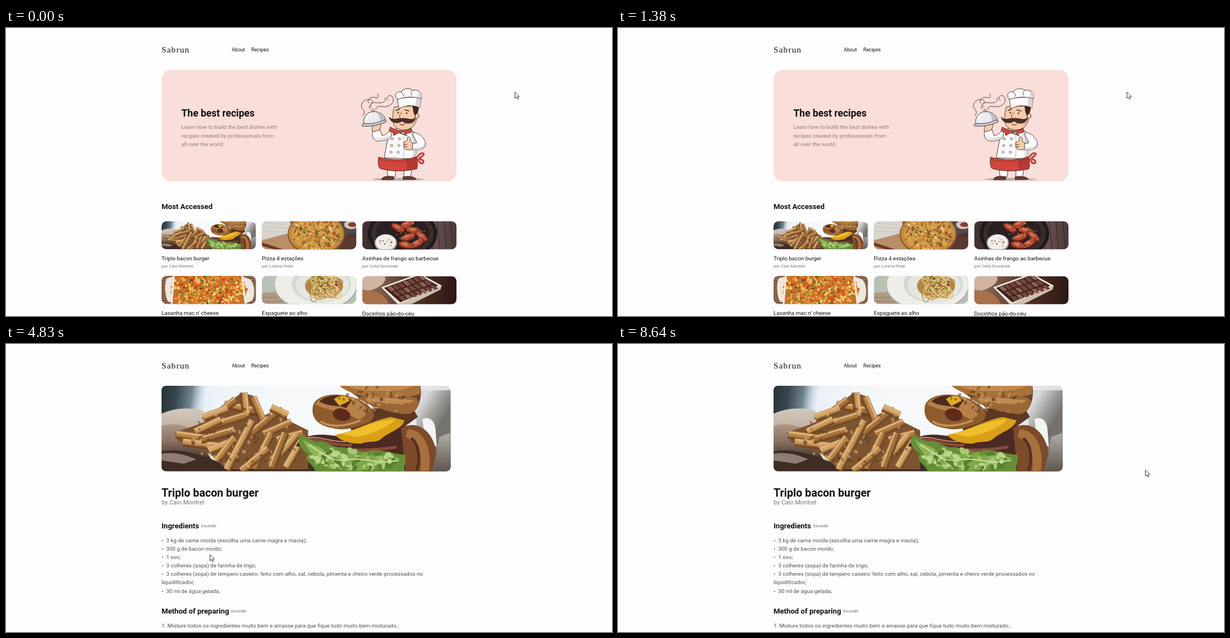
These frames come from a looping animation (1083x517 px, 8970 ms). An HTML page with a canvas:

```html
<!DOCTYPE html>
<html lang="pt">
<head>
<meta charset="utf-8">
<title>Recipes</title>
<style>
html,body{margin:0;width:100%;height:100%;overflow:hidden;background:#fdfdfd}
#stage{position:relative;width:1083px;height:517px;overflow:hidden;background:#fdfdfd;font-family:Roboto,sans-serif}
.page,.group{position:absolute;left:0;top:0;width:1083px}
canvas{position:absolute;left:0;top:0}
.t{position:absolute;white-space:pre;line-height:15.1px;font-size:9.88px;color:#111}
.logo{font:15px/15.1px "Liberation Serif",serif;letter-spacing:1.3px}
.nav{font-size:8.8px}
.hero,.h1,.h2,.h3{font-weight:700;margin-top:.6px}
.hero{font-size:17.5px}
.soft{color:#8b7f7c}
.h1{font-size:19.7px}
.h2{font-size:13.15px}
.h3{font-size:10.94px}
.by{font-size:7.7px;color:#777}
.author{font-size:10.94px;color:#777}
.body{color:#505050}
.btn{font-size:6.56px;font-weight:500;color:#888}
#foot{position:absolute;left:0;top:568px;width:1083px;height:33px;background:#f9f9f9}
.foot{width:1083px;text-align:center;font-size:7.66px;color:#888}
#status{position:absolute;left:0;bottom:0;height:14px;padding:0 2px;background:#2b2a33;color:#f5f5f7;font:7.6px/14px "Open Sans",sans-serif;white-space:pre}
</style>
</head>
<body>
<div id="stage">
  <div class="page" id="home"><div id="foot"></div></div>
  <div class="page" id="about"></div>
  <div class="page" id="recipe">
    <div class="group" id="ingr"></div>
    <div class="group" id="method"></div>
  </div>
  <div id="status"></div>
  <canvas id="pointer" width="1083" height="517"></canvas>
</div>
<script>
const $ = id => document.getElementById(id);
const BRAND = 'Sabrun', HOST = 'kitchenpc:7300', COOK = 'Caio Montrel';

// ---------- text ----------
function text(parent, x, cy, cls, str) {
  const el = document.createElement('div');
  el.className = 't ' + cls;
  el.style.left = x + 'px';
  el.style.top = cy - 7.55 + 'px';
  el.textContent = str;
  parent.appendChild(el);
  return el;
}

// ---------- drawing helpers ----------
function layer(parent, h) {
  const cv = document.createElement('canvas');
  cv.width = 1083; cv.height = h;
  parent.prepend(cv);
  return cv.getContext('2d');
}
function random(seed) {
  return () => (seed = seed * 16807 % 2147483647) / 2147483647;
}
function path(c, d, fill, line, width = 0.9) {
  const p = new Path2D(d);
  if (fill) { c.fillStyle = fill; c.fill(p); }
  if (line) { c.strokeStyle = line; c.lineWidth = width; c.stroke(p); }
}
function oval(c, x, y, rx, ry, fill, rot = 0, line, width = 0.9) {
  c.beginPath();
  c.ellipse(x, y, rx, ry, rot, 0, 7);
  if (fill) { c.fillStyle = fill; c.fill(); }
  if (line) { c.strokeStyle = line; c.lineWidth = width; c.stroke(); }
}
function grad(c, x0, y0, x1, y1, colors) {
  const g = c.createLinearGradient(x0, y0, x1, y1);
  colors.forEach((col, i) => g.addColorStop(i / (colors.length - 1), col));
  return g;
}
function bg(c, fill, w = 169, h = 51) {
  c.fillStyle = fill;
  c.fillRect(0, 0, w, h);
}
// scattered toppings inside an ellipse
function dots(c, seed, n, x, y, rx, ry, size, cols) {
  const r = random(seed);
  for (let i = 0; i < n; i++) {
    const a = r() * 6.283, d = Math.sqrt(r());
    oval(c, x + Math.cos(a) * d * rx, y + Math.sin(a) * d * ry,
      size * (0.5 + r()), size * (0.4 + r() * 0.6), cols[i % cols.length], r() * 3);
  }
}
function photo(c, x, y, w, h, r, draw, k = 1) {
  c.save();
  c.beginPath();
  c.roundRect(x, y, w, h, r);
  c.clip();
  c.translate(x, y);
  c.scale(k, k);
  draw(c);
  c.restore();
}

// ---------- pictures ----------
function fry(c, x0, y0, x1, y1, tone) {
  const len = Math.hypot(x1 - x0, y1 - y0), nx = (y0 - y1) / len, ny = (x1 - x0) / len;
  const side = ny > 0 ? 1 : -1;
  for (const [col, w, off] of [['#6b4526', 14, 1.5], [tone, 11.5, 0], ['#dcb580', 3, -3], ['#8f5f30', 2, 4.5]]) {
    c.strokeStyle = col; c.lineWidth = w;
    const ox = nx * off * side, oy = ny * off * side;
    c.beginPath(); c.moveTo(x0 + ox, y0 + oy); c.lineTo(x1 + ox, y1 + oy); c.stroke();
  }
}

function burger(c) {
  // blurred room
  bg(c, grad(c, 0, 0, 517, 0, ['#dbe7f0', '#eef4f8', '#f6f8f9', '#f6f8f9', '#eff1f2', '#dcdfe0']), 517, 154);
  bg(c, grad(c, 0, 0, 82, 12, ['#263236', '#39474c', '#71848f', 'rgba(200,217,229,0)']), 84, 60);
  path(c, 'M0 50C22 40 48 38 74 44L84 72L60 92L0 84Z', grad(c, 0, 44, 0, 92, ['#d2c6bb', '#b9a595']));
  path(c, 'M0 72C24 66 44 70 60 84L100 150H0Z', grad(c, 0, 70, 0, 128, ['#ad9686', '#8a7363', '#493a31']));
  path(c, 'M0 118C30 112 62 120 110 140L280 118L430 140L517 134V154H0Z', '#3f2d25');
  path(c, 'M0 122C24 118 44 124 62 132L40 140L0 134Z', '#8d7d72');
  path(c, 'M452 8H517V152H460Z', grad(c, 452, 0, 517, 40, ['#c6c8cc', '#d9dbdc', '#a3a29f', '#75716d']));
  path(c, 'M466 60C478 54 490 62 490 84L492 110L470 92Z', '#f2f4f3');
  path(c, 'M496 92L517 84V154H486Z', grad(c, 0, 90, 0, 154, ['#aaa6a2', '#5d5550']));

  // fries
  path(c, 'M24 84C48 74 92 66 106 40L144 12L164 18L178 56L214 38L226 62L262 80L262 150H116L88 124L30 100Z', '#7d5330');
  const tones = ['#bd8647', '#cb9859', '#a97139', '#d3a264', '#b47c40'];
  [[112, 32, 176, 46], [148, 12, 152, 54], [104, 46, 132, 24], [74, 56, 118, 40], [92, 70, 150, 52],
    [164, 20, 182, 62], [60, 82, 106, 60], [160, 84, 208, 44], [196, 38, 226, 52], [182, 86, 232, 64],
    [26, 86, 84, 94], [38, 100, 104, 108], [70, 96, 130, 78], [84, 116, 128, 98], [206, 96, 252, 84],
    [98, 134, 130, 92], [212, 122, 242, 86], [196, 146, 220, 84], [222, 146, 250, 98], [164, 148, 196, 84],
    [142, 152, 190, 112], [116, 150, 162, 62]
  ].forEach((f, i) => fry(c, ...f, tones[i % 5]));
  dots(c, 61, 80, 150, 92, 100, 54, 3, ['rgba(92,56,26,.55)', 'rgba(228,190,138,.5)']);

  // bacon and patties
  path(c, 'M240 108C254 84 290 84 330 94L432 66L452 92L440 132L300 126Z', '#4a2a22');
  path(c, 'M246 100C272 88 306 110 340 106M262 114C292 104 330 124 420 110', null, '#8a4c39', 5);
  path(c, 'M252 96C276 86 300 102 330 100', null, '#c08a72', 2);
  path(c, 'M428 76C462 58 488 88 491 122L484 154H436Z', '#7d4a2a');
  path(c, 'M440 78C468 78 484 112 478 152L462 154C468 122 454 98 436 92Z', '#a9703f');
  path(c, 'M446 94C462 106 462 134 456 152', null, '#54301f', 5);

  // stacked rings, cheese and bun
  path(c, 'M330 46L446 34L458 56L436 72L340 84Z', '#5e3822');
  path(c, 'M316 -4H462C466 18 462 44 442 52C420 46 396 36 362 28Z', '#6f4424');
  path(c, 'M350 22C380 12 440 14 460 24C462 40 448 54 430 50C404 48 372 36 350 22Z', '#9b6636');
  path(c, 'M364 24C396 18 430 24 452 26C446 36 400 34 364 24Z', '#bf8a50');
  path(c, 'M314 -4H462V14C444 24 420 14 396 22C366 22 330 14 314 -4Z', '#a8713c');
  path(c, 'M326 -4H456C448 6 420 10 390 9C360 10 338 6 326 -4Z', '#c08a50');
  path(c, 'M310 88C340 84 376 62 410 56L434 62C430 78 408 82 394 94C384 104 370 98 356 104C338 104 320 100 310 88Z', '#d99f16');
  path(c, 'M320 86C350 80 380 62 418 60C404 76 372 88 348 92Z', '#f0bf2c');
  path(c, 'M270 40C272 10 330 10 358 28C384 42 386 60 366 68C346 74 330 82 306 76C282 72 268 60 270 40Z', '#8f5a2c');
  path(c, 'M274 34C286 12 330 12 352 28C372 40 372 54 352 60C330 48 304 46 274 34Z', '#b8814a');
  path(c, 'M282 28C296 14 326 14 340 26L330 40C312 34 298 38 282 28Z', '#4b2b1a');
  path(c, 'M308 24C318 15 334 17 336 27L318 36Z', '#e3ab1f');
  oval(c, 322, 52, 16, 11, '#5e2a1c', 0.25);
  path(c, 'M284 64C306 78 336 70 356 62', null, '#c39058', 4);
  dots(c, 15, 60, 384, 24, 76, 24, 3, ['rgba(80,46,22,.5)', 'rgba(214,164,106,.45)']);

  // lettuce
  path(c, 'M246 90C256 84 262 100 280 100C296 98 304 112 322 110C344 112 354 122 376 116C396 114 412 122 436 124C438 138 430 146 436 154H276C270 140 252 134 262 122C250 116 242 104 246 90Z', '#668f38');
  path(c, 'M252 96C268 108 282 106 292 118C312 114 326 128 346 122C366 130 390 120 426 130C408 142 388 132 372 150C340 138 312 150 292 138C278 134 262 118 252 96Z', '#8db556');
  dots(c, 9, 95, 342, 134, 78, 18, 6, ['#7fa84a', '#a9c974', '#56802f', '#bcd68b']);
  path(c, 'M262 106C290 120 300 140 336 132C362 128 380 142 424 134', null, '#cfe0a4', 2);
}

function pizza(c) {
  bg(c, grad(c, 0, 0, 169, 0, ['#a98a76', '#8d6750', '#6d4535', '#4b312b']));
  path(c, 'M0 0H50L56 22L4 34L0 32Z', '#d9d5cf');
  path(c, 'M8 3L42 6M6 10L46 13M4 18L50 19', null, '#c4beb7', 1);
  path(c, 'M0 34L60 18L70 51H0Z', '#b78e67');
  path(c, 'M0 38L40 51H24L0 44Z', '#70352c');
  path(c, 'M130 0H169V20L140 26Z', '#51494a');
  oval(c, 160, 6, 13, 8, '#cfc5bd');
  oval(c, 162, 6, 8, 4, '#8c3a2e');
  path(c, 'M142 34L169 26V51H138Z', '#5a3a31');
  oval(c, 97, 23, 51, 38, '#8f5726');
  oval(c, 97, 22, 49, 36, '#c48a42');
  oval(c, 97, 22, 43, 31, '#d39b45');
  dots(c, 21, 190, 97, 22, 42, 30, 2.3, ['#dcb560', '#ad4f2a', '#e6cf95', '#8a5a2a', '#b9742f', '#77702f']);
  path(c, 'M97 22L52 8M97 22L62 51M97 22L108 56M97 22L144 36M97 22L134 -4M97 22L88 -8', null, '#7d4a21', 0.9);
}

function wings(c) {
  bg(c, grad(c, 0, 0, 169, 0, ['#453433', '#2c2223', '#3a2a2a', '#6a5250', '#4c3a39']));
  for (let x = 122; x < 169; x += 12) path(c, `M${x} 0L${x + 5} 51`, null, '#32272a', 1.2);
  oval(c, 72, 22, 62, 46, '#1f191b');
  oval(c, 72, 22, 56, 40, '#392c2b');
  oval(c, 72, 22, 48, 33, '#2a2021');
  const spots = [[80, 6, -0.3], [64, 12, 0.5], [92, 17, 0.2], [106, 27, 0.7], [82, 29, -0.3], [98, 40, -0.5], [78, 43, 0.2]];
  for (const [x, y, a] of spots) {
    oval(c, x, y, 14, 6.5, '#6d2519', a);
    oval(c, x, y - 1, 12, 5, '#b04a30', a);
    oval(c, x - 2, y - 2.3, 6, 1.8, '#d37c57', a);
  }
  dots(c, 5, 55, 88, 24, 27, 24, 0.8, ['#f0d9b9', '#e3a36c']);
  oval(c, 42, 39, 20, 16, '#aaa6a2');
  oval(c, 42, 38, 18, 14, '#f0efea');
  dots(c, 12, 24, 42, 38, 12, 9, 1.2, ['#7f9a56', '#d3d8c3', '#b6524a']);
}

function lasagna(c) {
  bg(c, '#74503a');
  for (let y = 2; y < 51; y += 4) path(c, `M0 ${y}H169`, null, '#a98260', 1.3);
  path(c, 'M10 4C4 10 6 40 12 46L28 51H148L162 44C168 34 166 12 158 6L140 0H28Z', '#ece7de');
  path(c, 'M22 0H144L150 51H18Z', '#c8722a');
  dots(c, 31, 430, 84, 25, 68, 34, 2.7, ['#e18a2e', '#f1bd52', '#c4491f', '#efa23e', '#d9652a', '#f4d37d']);
  dots(c, 44, 80, 84, 25, 64, 29, 1.7, ['#4f7c2b', '#78963b', '#365c22']);
  path(c, 'M22 0L18 51M144 0L150 51', null, '#f1ece4', 3);
}

function pasta(c) {
  bg(c, grad(c, 0, 0, 169, 20, ['#b6bfb0', '#c9d2c8', '#b9c2b8']));
  path(c, 'M0 31L50 26L66 51H0Z', '#b19a85');
  path(c, 'M0 39L58 38M0 46L62 46', null, '#91735c', 1.2);
  oval(c, 96, 18, 74, 46, '#a5aaa0');
  oval(c, 96, 16, 73, 45, '#eceee8');
  oval(c, 106, 15, 53, 33, '#d4dad1');
  oval(c, 108, 17, 47, 30, '#e4e7e0');
  const r = random(18);
  oval(c, 111, 18, 34, 22, '#b68c48');
  for (let i = 0; i < 60; i++) {
    oval(c, 111 + (r() - 0.5) * 36, 18 + (r() - 0.5) * 22, 7 + r() * 13, 4 + r() * 8,
      null, r() * 3, ['#d7b46b', '#ead092', '#a97938'][i % 3], 1.2);
  }
  dots(c, 8, 34, 108, 13, 27, 15, 2, ['#4f6c2c', '#78893a', '#733c26']);
}

function sweets(c) {
  bg(c, grad(c, 0, 0, 169, 20, ['#9a7a68', '#6d4a3b', '#4a2a21', '#2d1813']));
  path(c, 'M0 0H40C46 10 30 22 12 26L0 24Z', '#d0b3a0');
  path(c, 'M0 28C18 22 40 30 48 51H0Z', '#a9714b');
  path(c, 'M34 20L102 -5L142 17L140 24L72 58L64 51Z', '#cfc0b2');
  path(c, 'M34 20L102 -5L142 17L66 50Z', '#f0e8df');
  path(c, 'M39 21L102 -2L136 17L68 47Z', '#3c211b');
  for (let i = 0; i < 7; i++) {
    for (let j = 0; j < 3; j++) {
      const x = 44 + i * 9.3 + j * 10.5, y = 20 - i * 3.3 + j * 8.7;
      path(c, `M${x} ${y}l6.8 -2.5l8.4 7l-6.8 2.8z`, (i + j) % 3 ? '#714237' : '#8c6053');
      path(c, `M${x + 2} ${y}l8 7`, null, '#a7786a', 0.7);
    }
  }
}

function chef(c) {
  const ink = '#3d2a26', skin = '#f6cba9', coat = '#fbfafa', shade = '#d8d5d8', red = '#d2473d';
  const draw = (d, fill, line = ink) => path(c, d, fill, line);
  c.lineJoin = c.lineCap = 'round';
  oval(c, 701, 271.5, 47, 2.2, '#b9aaa6');
  draw('M681 254L683 268H695L697 255ZM711 255V268H723L725 254Z', coat);
  draw('M671 272C672 266 684 265 693 267V272ZM710 267C720 265 732 267 733 272H710Z', '#6b3a2c');
  path(c, 'M734 233C742 220 751 225 744 230C738 234 736 234 744 237C750 242 742 248 736 236', null, '#8d2a27', 3);
  path(c, 'M734 233C742 220 751 225 744 230C738 234 736 234 744 237C750 242 742 248 736 236', null, red, 1.8);
  draw('M688 184C682 194 680 212 676 233L731 235C735 220 735 200 728 186C716 178 700 178 688 184Z', coat);
  draw('M719 184C729 198 730 216 726 234L731 235C736 218 736 198 728 186Z', shade, null);
  draw('M709 190C713 204 712 220 710 234', null, '#b5aeb0');
  for (let i = 0; i < 3; i++) for (const x of [690, 703]) oval(c, x - i, 199 + i * 12, 2, 2, '#fff', 0, ink, 0.7);
  draw('M666 232C690 238 715 238 733 231C736 240 736 250 734 253C712 258 686 258 668 252C664 246 665 238 666 232Z', red);
  draw('M714 237L733 232C736 240 736 250 734 253L717 255Z', '#b53a33', null);
  draw('M666 236C690 241 715 241 734 235', null, '#8d2a27');
  // raised arm with the dish
  draw('M689 183C682 188 676 194 672 193L668 181L655 185C654 194 656 202 664 203C676 203 686 200 688 196Z', coat);
  draw('M658 197C664 202 678 201 686 196L688 192C680 198 668 199 658 197Z', shade, null);
  draw('M656 186C652 180 655 174 661 173L669 172C672 175 668 180 667 183Z', skin);
  oval(c, 658, 171, 22.5, 4, '#c9c9cd', -0.17, ink);
  draw('M639 171C638 157 648 150 657 150C669 150 677 157 678 164C666 170 650 173 639 171Z', '#ececef');
  draw('M661 151C671 152 677 158 677 164L667 168C670 162 667 155 661 151Z', '#bfbfc5', null);
  path(c, 'M645 165C645 159 648 156 652 154', null, '#fff', 1.8);
  oval(c, 656, 148.5, 2.2, 2, '#e6e6ea', 0, ink);
  draw('M651 145C643 139 662 134 652 129C643 126 632 134 636 143C639 148 644 152 637 157', null);
  draw('M661 146C662 136 672 143 680 141C691 139 695 129 690 123C684 118 677 125 683 129', null);
  draw('M654 143C648 138 652 133 662 134C676 136 681 130 677 125M648 135C644 129 652 122 660 125C666 128 666 121 664 118', null);
  // head
  draw('M694 142C690 152 691 166 693 174C698 184 716 186 726 178C735 170 737 152 734 140Z', skin);
  draw('M727 173C733 166 735 154 733 144L729 145C730 156 729 166 723 177Z', '#e3aa86', null);
  draw('M726 139L738 138C738 148 736 154 731 157C727 152 728 146 726 139Z', '#3b2621', null);
  oval(c, 735, 158, 3.2, 4.5, skin, 0.1, ink);
  oval(c, 701, 152, 1.2, 1.7, ink);
  oval(c, 716, 153, 1.2, 1.7, ink);
  path(c, 'M697 148L703 146M713 147L720 149', null, ink, 1.6);
  draw('M707 152C700 159 703 164 711 162', skin);
  draw('M708 163C700 160 692 168 685 160C687 172 702 172 708 167C716 174 730 172 732 161C724 168 717 160 708 163Z', '#4a2f28');
  path(c, 'M704 173C708 175 711 174 713 172', null, '#a54f41', 1.5);
  draw('M699 126L702 145C714 138 728 138 740 143L742 124Z', coat);
  draw('M733 124L732 140L740 143L742 124Z', shade, null);
  draw('M700 128C692 122 698 112 706 115C710 107 724 108 727 112C736 109 746 116 742 127C728 122 712 124 700 128Z', coat);
  draw('M733 113C738 116 738 121 735 124L742 126C745 118 740 112 733 113Z', shade, null);
  draw('M706 115C710 117 711 120 710 123M727 112C723 115 723 118 725 121', null);
  draw('M687 178C700 186 716 186 724 180L726 186C716 191 706 191 702 188L693 193L691 187L685 185ZM704 188L717 194L711 187Z', red);
  // thumbs-up arm
  draw('M729 187C742 190 752 202 749 212C746 218 736 220 726 219L724 208L734 206C732 200 728 196 727 190Z', coat);
  draw('M749 208C746 214 736 216 726 215V219C738 220 748 218 749 208Z', shade, null);
  draw('M711 205C716 204 718 201 717 197C720 193 724 196 722 203L727 206L726 218C720 220 711 218 711 214Z', skin);
  draw('M711 209H717M711 213H717', null);
}

// ---------- pages ----------
const home = $('home'), about = $('about'), recipe = $('recipe'), ingr = $('ingr'), method = $('method');

for (const p of [home, about, recipe]) {
  text(p, 278, 39.5, 'logo', BRAND);
  text(p, 403.5, 40, 'nav', 'About');
  text(p, 438.5, 40, 'nav', 'Recipes');
}

const hc = layer(home, 602);
hc.fillStyle = '#f9deda';
hc.beginPath(); hc.roundRect(278, 75, 527, 200.5, 17); hc.fill();
chef(hc);
text(home, 313.5, 152.5, 'hero', 'The best recipes');
text(home, 313.5, 178, 'soft', 'Learn how to build the best dishes with\nrecipes created by professionals from\nall over the world.');
text(home, 278, 320, 'h2', 'Most Accessed');
[
  ['Triplo bacon burger', COOK, burger, 0.3264],
  ['Pizza 4 estações', 'Lorena Pidal', pizza],
  ['Asinhas de frango ao barbecue', 'Celia Drovanek', wings],
  ["Lasanha mac n' cheese", 'Renato Queiral', lasagna],
  ['Espaguete ao alho', 'Alícia Temura', pasta],
  ['Docinhos pão-do-céu', 'Marcelo Bastim', sweets]
].forEach(([name, who, draw, k], i) => {
  const x = 278 + i % 3 * 179.3, y = 347 + (i > 2 ? 98 : 0) + (i === 5 ? 0.6 : 0);
  photo(hc, x, y, 168.5, 50.2, 8.8, draw, k);
  text(home, x, y + 66.4 + (i === 5 ? 0.6 : 0), '', name);
  text(home, x, y + 80.4 + (i === 5 ? 0.6 : 0), 'by', 'por ' + who);
});
text(home, 0, 585, 'foot', `Todos direitos reservados, receitas ${BRAND}.`);

const second = `Fusce nec pulvinar nunc. Duis porttitor tincidunt accumsan. Quisque pulvinar mollis ipsum ut accumsan. Proin ligula
lectus, rutrum vel nisl quis, efficitur porttitor nisl. Morbi ut accumsan felis, eu ultrices lacus. Integer in tincidunt arcu, et
posuere ligula. Morbi cursus facilisis feugiat. Praesent euismod nec nisl at accumsan. Donec libero neque, vulputate
semper orci et, malesuada sodales eros. Nunc ut nulla faucibus enim ultricies euismod.`;
const both = `Suspendisse placerat neque neque. Morbi dictum nulla non sapien rhoncus, et mattis erat commodo. Aliquam vel lacus
a justo mollis luctus. Proin vel auctor eros, sed eleifend nunc. Curabitur eget tincidunt risus. Mauris malesuada facilisis
magna, vitae volutpat sapien tristique eu. Morbi metus nunc, interdum in erat placerat, aliquam iaculis massa. Duis
vulputate varius justo pharetra maximus. In vehicula enim nec nibh porta tincidunt. Vestibulum at ultrices turpis, non
dictum metus. Vivamus ligula ex, semper vitae eros ut, euismod convallis augue.

` + second;
text(about, 278, 84, 'h2', 'Sobre o ' + BRAND);
text(about, 278, 106, 'body', both);
text(about, 278, 275, 'h3', 'Como tudo começou...');
text(about, 278, 297, 'body', both);
text(about, 278, 465, 'h3', 'Nossas receitas');
text(about, 278, 487, 'body', second);

photo(layer(recipe, 517), 278, 75, 516.5, 153.5, 8, burger);
text(recipe, 278, 266.5, 'h1', 'Triplo bacon burger');
text(recipe, 278, 285, 'author', 'by ' + COOK);
text(recipe, 278, 326, 'h2', 'Ingredients');
const ingrBtn = text(recipe, 349, 328, 'btn', '');
text(ingr, 278, 352.5, 'body', `•  3 kg de carne moída (escolha uma carne magra e macia);
•  300 g de bacon moído;
•  1 ovo;
•  3 colheres (sopa) de farinha de trigo;
•  3 colheres (sopa) de tempero caseiro: feito com alho, sal, cebola, pimenta e cheiro verde processados no
liquidificador;
•  30 ml de água gelada;`);
text(method, 278, 479, 'h2', 'Method of preparing');
const methodBtn = text(method, 402.5, 481, 'btn', '');
const steps = text(method, 278, 505.5, 'body', `1. Misture todos os ingredientes muito bem e amasse para que fique tudo muito bem misturado.;
2. Faça porções de 90 g a 100 g.;
3. Forre um plástico molhado em uma bancada e modele os hambúrgueres utilizando um aro como base.;
4. Faça um de cada vez e retire o aro logo em seguida.;
5. Forre uma assadeira de metal com plástico, coloque os hambúrgueres e intercale camadas de carne e plásticos (sem
apertar).;
6. Faça no máximo 4 camadas por forma e leve para congelar.;
7. Retire do congelador, frite ou asse e está pronto.;`);

// ---------- timeline ----------
const LOOP = 8970;
const scrollKeys = [[0, 0], [460, 1], [490, 4], [520, 12], [550, 26], [580, 44], [610, 73], [640, 81], [670, 84],
  [1230, 81], [1260, 68], [1290, 40], [1320, 14], [1350, 3], [1380, 0]];
// start, end, x, y of each pointer move
const moves = [[0, 0, 909.5, 115], [1710, 2500, 406, 41], [2930, 3650, 316, 38], [3880, 4480, 364.5, 378],
  [4830, 5600, 362, 332], [5790, 6130, 417, 365.5], [6820, 7620, 362, 343], [7640, 7740, 362, 332], [7990, 8640, 942.5, 226]];
const shapes = [[0, 'arrow'], [2400, 'hand'], [2990, 'arrow'], [3500, 'hand'], [4030, 'arrow'], [4280, 'hand'],
  [4700, 'arrow'], [5480, 'beam'], [5850, 'arrow'], [6070, 'beam'], [6900, 'arrow'], [7560, 'beam'], [8060, 'arrow']];
const clicks = [[2640, 2910], [5690, 5750], [6130, 6320], [6730, 6790], [7910, 7970]];
const links = [[2400, 2990, '/about'], [3500, 4030, ''], [4280, 4700, '/recipes/0']];

const within = (t, a, b) => t >= a && t < b;
const ease = u => u * u * (3 - 2 * u);

function scrollAt(t) {
  let i = scrollKeys.length - 1;
  while (scrollKeys[i][0] > t) i--;
  return scrollKeys[i][1];
}
function pointAt(t) {
  let [, , x, y] = moves[0];
  for (const [a, b, nx, ny] of moves.slice(1)) {
    if (t <= a) break;
    const u = ease(Math.min(1, (t - a) / (b - a)));
    x += (nx - x) * u;
    y += (ny - y) * u;
  }
  return [x, y];
}

const pc = $('pointer').getContext('2d');
const cursor = {
  arrow() {
    path(pc, 'M0 0V11.2L2.6 8.8L4.4 12.8L6.4 11.9L4.6 8.1H8.1Z', '#fff', '#222', 0.9);
  },
  hand() {
    path(pc, 'M-1.3 10V1.2C-1.3 -.5 1.3 -.5 1.3 1.2V6C3 5 4 5.6 4 6.6C5.6 5.8 6.5 6.4 6.6 7.4C8 7 8.6 7.8 8.5 9C8.5 13 7.6 14 7 17H0C-1 14 -4 12 -4.4 9.5C-4.4 8 -2.5 8 -1.3 10Z', '#fff', '#222', 0.9);
    path(pc, 'M1.3 6V9M4 6.8V9.2M6.6 7.6V9.5', null, '#222', 0.7);
  },
  beam() {
    path(pc, 'M-2.5 -5.5H-.8L0 -4.8L.8 -5.5H2.5M0 -4.8V4.8M-2.5 5.5H-.8L0 4.8L.8 5.5H2.5', null, '#222', 1);
  }
};

function drawPointer(t) {
  const [x, y] = pointAt(t);
  pc.clearRect(0, 0, 1083, 517);
  const hit = clicks.find(([a, b]) => within(t, a, b));
  if (hit) {
    const r = t - hit[0] < 70 ? 6 : 8.3;
    oval(pc, x, y - 0.5, r, r, 'rgba(246,236,40,.78)');
  }
  pc.save();
  pc.translate(x, y);
  cursor[shapes.filter(s => s[0] <= t).pop()[1]]();
  pc.restore();
}

function render(t) {
  const page = t < 2910 ? home : t < 3860 ? about : t < 4700 ? home : recipe;
  for (const p of [home, about, recipe]) p.style.display = p === page ? 'block' : 'none';
  home.style.top = -scrollAt(t) + 'px';

  const noIngr = within(t, 5750, 7970), noSteps = within(t, 6320, 6790);
  ingr.style.display = noIngr ? 'none' : 'block';
  steps.style.display = noSteps ? 'none' : 'block';
  method.style.top = noIngr ? '-116.5px' : '0';
  ingrBtn.textContent = noIngr ? 'Mostrar' : 'Esconder';
  methodBtn.textContent = noSteps ? 'Mostrar' : 'Esconder';

  const link = links.find(([a, b]) => within(t, a, b));
  $('status').style.display = link ? 'block' : 'none';
  if (link) $('status').textContent = HOST + link[2];
  drawPointer(t);
}

const begin = performance.now();
function tick() {
  render((performance.now() - begin) % LOOP);
  requestAnimationFrame(tick);
}
tick();
</script>
</body>
</html>
```
